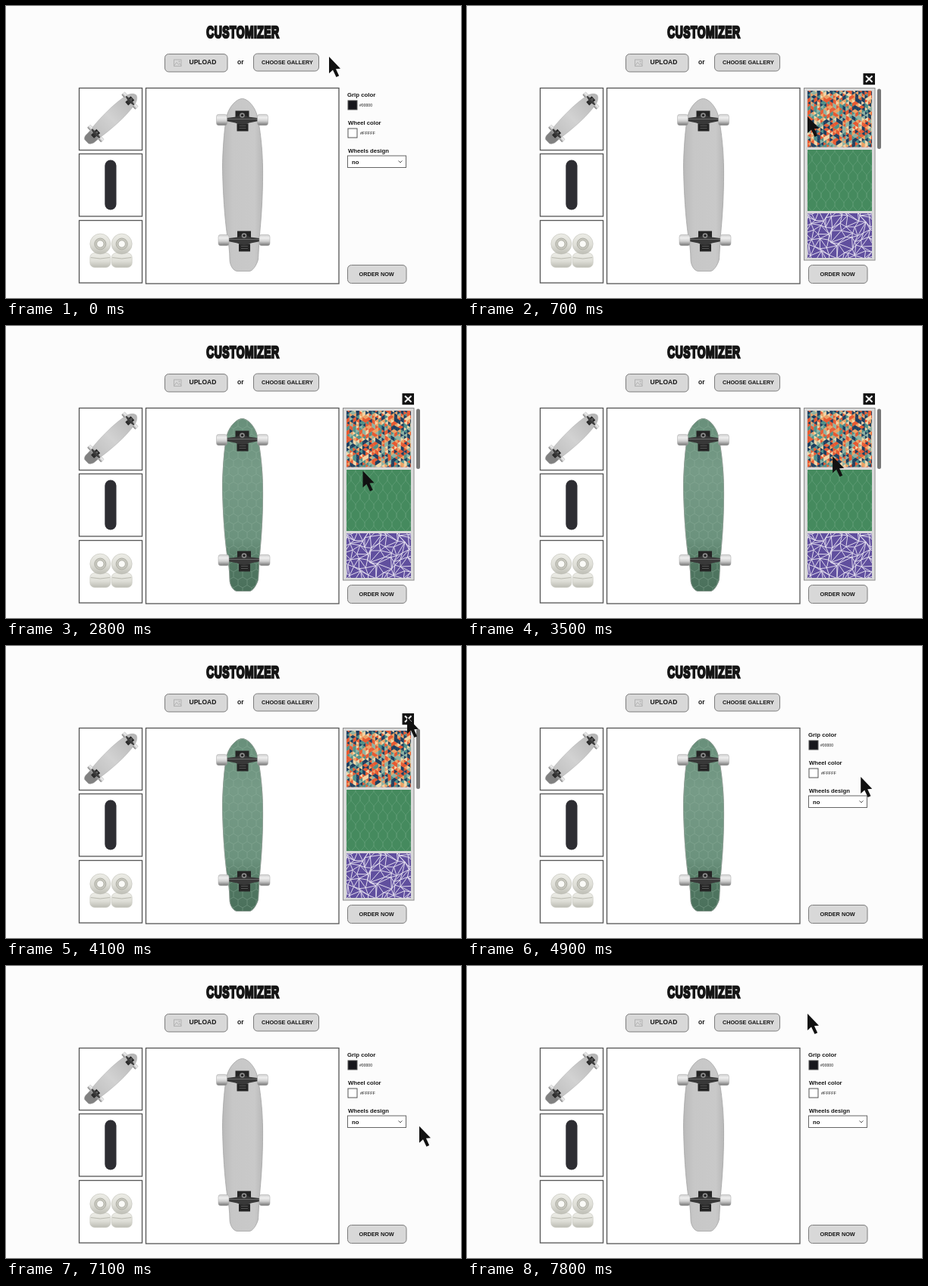
An HTML page that plays this animation: 600x386 px, repeating every 7900 ms.

```html
<!DOCTYPE html>
<html lang="en">
<head>
<meta charset="utf-8">
<title>Customizer</title>
<style>
  html, body { margin: 0; width: 100%; height: 100%; overflow: hidden; background: #fcfcfc; }
  svg { display: block; }
  #stage { width: 600px; height: 386px; }
  text { font: bold 7.7px "Liberation Sans", Arial, sans-serif; fill: #161616; }
  .small { font-weight: normal; }
  .frame { fill: #fff; stroke: #555; stroke-width: 1.3; }
  .button { fill: #d8d8d8; stroke: #7c7c7c; }
</style>
</head>
<body>
<svg id="stage" viewBox="0 0 600 386">
  <defs>
    <linearGradient id="deckGray">
      <stop offset="0" stop-color="#b9b9b9"/><stop offset=".25" stop-color="#c7c7c7"/>
      <stop offset=".8" stop-color="#c9c9c9"/><stop offset="1" stop-color="#b8b8b8"/>
    </linearGradient>
    <linearGradient id="deckGreen" x1="0" y1="0" x2="0" y2="1">
      <stop offset="0" stop-color="#688f7a"/><stop offset=".3" stop-color="#769b87"/>
      <stop offset=".7" stop-color="#6b927d"/><stop offset=".85" stop-color="#507661"/>
      <stop offset="1" stop-color="#4a705b"/>
    </linearGradient>
    <linearGradient id="thumbGray" x1="0" y1="0" x2="0" y2="1">
      <stop offset="0" stop-color="#b4b4b4"/><stop offset=".5" stop-color="#d2d2d2"/>
      <stop offset=".78" stop-color="#c4c4c4"/><stop offset=".88" stop-color="#818181"/>
    </linearGradient>
    <linearGradient id="wheelShade" x1="0" y1="0" x2="0" y2="1">
      <stop offset="0" stop-color="#d0d0d0"/><stop offset=".3" stop-color="#eeeeee"/>
      <stop offset=".6" stop-color="#d0d0d0"/><stop offset="1" stop-color="#747474"/>
    </linearGradient>
    <linearGradient id="ivory" x1="0" y1="0" x2="0" y2="1">
      <stop offset="0" stop-color="#ecece6"/><stop offset=".55" stop-color="#dfdfd8"/>
      <stop offset="1" stop-color="#bdbdb4"/>
    </linearGradient>
    <pattern id="honeycomb" width="12" height="21" patternUnits="userSpaceOnUse" x="306" y="122">
      <path d="M0 3.5L6 0L12 3.5V10.5L6 14L0 10.5ZM6 14V21" fill="none" stroke="#93b5a1" stroke-width="1"/>
    </pattern>
    <pattern id="lattice" width="12" height="24" patternUnits="userSpaceOnUse">
      <path d="M0 0C0 6 6 6 6 12C6 18 0 18 0 24M12 0C12 6 6 6 6 12C6 18 12 18 12 24"
        fill="none" stroke="#5f9c75" stroke-width="1"/>
    </pattern>
    <path id="deck" d="M311.500 122.500C319 122.500 328 133 331 144C334 156 338 183 338.500 212
      C339 250 336.500 280 334.500 302C333.500 316 333 328 332.500 335C330.500 343 325 350.500 321 350.500H305
      C300 350.500 295 343 295 335C295 325 293.500 312 291.500 302C288.500 280 286 248 285.500 212
      C286 183 288.500 156 291.500 144C294.500 133 304 122.500 311.500 122.500Z"/>
    <g id="truck">
      <path d="M-9-12H9V-3H-9ZM-7 5H8V15H-7Z" fill="#242424"/>
      <path d="M-24-2L-8-4Q0-9 8-4L24-2V1L9 4Q0 9-9 4L-24 1Z" fill="#383838"/>
      <path d="M-22-1H22" stroke="#767676" stroke-width=".8"/>
      <circle cy="-6" r="3.300" fill="#8a8a8a"/><circle cy="-6" r="1.600" fill="#1c1c1c"/>
      <path d="M-4 8H5M-4 11H5" stroke="#626262" stroke-width=".8"/>
      <g fill="url(#wheelShade)" stroke="#a4a4a4" stroke-width=".5">
        <rect x="-34" y="-7.200" width="14" height="14.400" rx="3"/>
        <rect x="20" y="-7.200" width="14" height="14.400" rx="3"/>
      </g>
    </g>
    <g id="trucks">
      <use href="#truck" x="311.500" y="150.500"/>
      <use href="#truck" x="314" y="309.500"/>
    </g>
    <g id="wheelPair">
      <rect x="-13.500" y="12" width="27" height="19" rx="6" fill="url(#ivory)" stroke="#c4c4bb" stroke-width=".6"/>
      <path d="M-12.500 18Q0 21 12.500 18" fill="none" stroke="#b9b9af"/>
      <circle r="13.500" fill="url(#ivory)" stroke="#c2c2b9" stroke-width=".6"/>
      <circle r="7.500" fill="#c9c9c0" stroke="#adada3"/>
      <circle r="4.700" fill="#fafaf7" stroke="#a3a399" stroke-width=".8"/>
    </g>
  </defs>

  <rect width="600" height="386" fill="#fcfcfc"/>
  <text transform="translate(264.300 42) scale(.62 1)" style="font-size:22.500px; letter-spacing:.7px" stroke="#161616"
    stroke-width="2.100" vector-effect="non-scaling-stroke">CUSTOMIZER</text>

  <rect class="button" x="209.500" y="63.500" width="82.500" height="23.500" rx="5"/>
  <g fill="none" stroke="#b2b2b2">
    <rect x="221.500" y="71" width="9.500" height="8.500"/>
    <path d="M222 78.500L225 74.500L227.500 77.500L229 76L231 78.500"/><circle cx="228.500" cy="73.500" r=".6"/>
  </g>
  <text x="241.500" y="77.300" style="font-size:8.500px">UPLOAD</text>
  <text x="305" y="76.800" style="font-size:8.500px">or</text>
  <rect class="button" x="326.500" y="63" width="86" height="23" rx="5"/>
  <text x="337" y="77.300" style="font-size:7.250px">CHOOSE GALLERY</text>

  <rect class="frame" x="96.500" y="108.500" width="83" height="82"/>
  <rect class="frame" x="96.500" y="195.500" width="83" height="82.500"/>
  <rect class="frame" x="96.500" y="283.500" width="83" height="82.500"/>
  <rect class="frame" x="184.500" y="108.500" width="254.500" height="258.500"/>

  <g transform="translate(140.500 147) rotate(47) scale(.394) translate(-312.500 -231)">
    <use href="#deck" fill="url(#thumbGray)" stroke="#aaa"/>
    <use href="#trucks"/>
  </g>
  <rect x="130.300" y="203.500" width="15.200" height="66" rx="7.600" fill="#2d2d32"/>
  <use href="#wheelPair" x="124.300" y="314.500"/>
  <use href="#wheelPair" x="152.700" y="314.500"/>

  <use href="#deck" fill="url(#deckGray)" stroke="#a5a5a5" stroke-width=".8"/>
  <g id="greenDeck">
    <use href="#deck" fill="url(#deckGreen)" stroke="#8b9b91" stroke-width=".8"/>
    <use href="#deck" fill="url(#honeycomb)" opacity=".38"/>
  </g>
  <use href="#trucks"/>

  <g id="options">
    <text x="450" y="120" style="font-size:7.800px">Grip color</text>
    <rect x="451" y="125" width="12" height="12" fill="#17171c" stroke="#555"/>
    <text class="small" x="466" y="133" style="font-size:5.100px">#00000</text>
    <text x="451" y="157">Wheel color</text>
    <rect x="451" y="162" width="12" height="12" fill="#fff" stroke="#555"/>
    <text class="small" x="467" y="170" style="font-size:5.500px">#FFFFF</text>
    <text x="451" y="193.500">Wheels design</text>
    <rect x="450.500" y="198" width="77" height="15.500" fill="#fff" stroke="#666"/>
    <text x="456" y="208.500">no</text>
    <path d="M517.500 204.500L520 207L522.500 204.500" fill="none" stroke="#444" stroke-width=".9"/>
  </g>

  <rect class="button" x="450.500" y="342.500" width="77.500" height="24" rx="5"/>
  <text x="465.500" y="357" style="font-size:7.300px">ORDER NOW</text>

  <g id="gallery">
    <rect x="444.500" y="108.500" width="93.500" height="227.500" fill="#d9d9d9" stroke="#8c8c8c"/>
    <svg id="mosaic" x="449" y="112" width="85" height="74.500"></svg>
    <svg x="449" y="190" width="85" height="81">
      <rect width="85" height="81" fill="#458a5e"/><rect width="85" height="81" fill="url(#lattice)" opacity=".8"/>
    </svg>
    <svg id="mesh" x="449" y="274" width="85" height="59"><rect width="85" height="59" fill="#604f9e"/></svg>
    <rect x="541" y="109.500" width="5" height="79.500" rx="2.500" fill="#777"/>
    <rect x="522.500" y="89" width="15.500" height="15" fill="#151515"/>
    <path d="M526 92.500L534.500 100.500M534.500 92.500L526 100.500" stroke="#fff" stroke-width="2"/>
  </g>

  <path id="cursor" d="M0 0V22L5 17.500L9.500 27L13.200 25.300L9 16.200L15 15.700Z" fill="#111"/>
</svg>
<script>
const LOOP = 7900, STEP = 100;
const byId = id => document.getElementById(id);

function addPath(parent, attributes) {
  const path = document.createElementNS("http://www.w3.org/2000/svg", "path");
  for (const name in attributes) path.setAttribute(name, attributes[name]);
  parent.appendChild(path);
}

function seeded(seed) {
  return () => (seed = (seed * 16807) % 2147483647) / 2147483647;
}

function drawMosaic() {
  const random = seeded(4127);
  const colors = ["#e85a32", "#1d3f5f", "#f2d6a8", "#4f938b", "#eea265", "#e85a32", "#1d3f5f", "#8fb3a2"];
  const shapes = colors.map(() => "");
  const w = 4.2, h = 2.7;
  for (let col = 0; col * w < 85; col++) {
    for (let row = -1; row * h < 75; row++) {
      const flip = (row + col) % 2 !== 0;
      const base = (col + flip) * w, apex = (col + !flip) * w, y = row * h;
      shapes[Math.floor(random() * colors.length)] += `M${base} ${y}V${y + 2 * h}L${apex} ${y + h}Z`;
    }
  }
  shapes.forEach((d, i) => addPath(byId("mosaic"), { d, fill: colors[i], stroke: colors[i], "stroke-width": .3 }));
}

function drawMesh() {
  const random = seeded(911), size = 9.5;
  const points = Array.from({ length: 9 }, (_, row) => Array.from({ length: 12 }, (_, col) =>
    [(col - .8 + random() * 1.1) * size, (row - .8 + random() * 1.1) * size]));
  let d = "";
  const line = (a, b) => d += `M${a}L${b}`;
  for (let row = 0; row < 8; row++) {
    for (let col = 0; col < 11; col++) {
      const a = points[row][col], b = points[row][col + 1];
      const c = points[row + 1][col], e = points[row + 1][col + 1];
      line(a, b);
      line(a, c);
      if (random() < .5) line(a, e); else line(b, c);
    }
  }
  addPath(byId("mesh"), { d, fill: "none", stroke: "#e2ddee", "stroke-width": 1 });
}

// Cursor stops: time, x, y
const stops = [
  [0, 426, 67], [200, 398, 75], [400, 398, 75], [700, 449, 146], [1100, 465.5, 202.5],
  [1600, 465.5, 202.5], [2500, 470.5, 191.5], [3300, 470.5, 191.5], [4000, 529, 94], [4400, 529, 94.5],
  [5600, 503, 303], [6000, 500, 310], [6400, 500, 349], [6600, 500, 350],
  [7250, 552, 190], [7800, 449, 63], [7900, 426, 67]
];

function cursorAt(t) {
  const i = stops.findIndex(stop => stop[0] > t);
  const [t0, x0, y0] = stops[i - 1], [t1, x1, y1] = stops[i];
  const u = (t - t0) / (t1 - t0), k = u * u * (3 - 2 * u);
  return [x0 + (x1 - x0) * k, y0 + (y1 - y0) * k];
}

function show(id, visible) {
  byId(id).style.display = visible ? "" : "none";
}

function render(t) {
  const open = t >= 400 && t < 4300;
  show("gallery", open);
  show("options", !open);
  show("greenDeck", t >= 1300 && t < 6700);
  byId("cursor").setAttribute("transform", `translate(${cursorAt(t)})`);
}

drawMosaic();
drawMesh();
render(0);
const start = performance.now();
function tick() {
  const t = (performance.now() - start) % LOOP;
  render(Math.floor(t / STEP) * STEP);
  requestAnimationFrame(tick);
}
requestAnimationFrame(tick);
</script>
</body>
</html>
```
